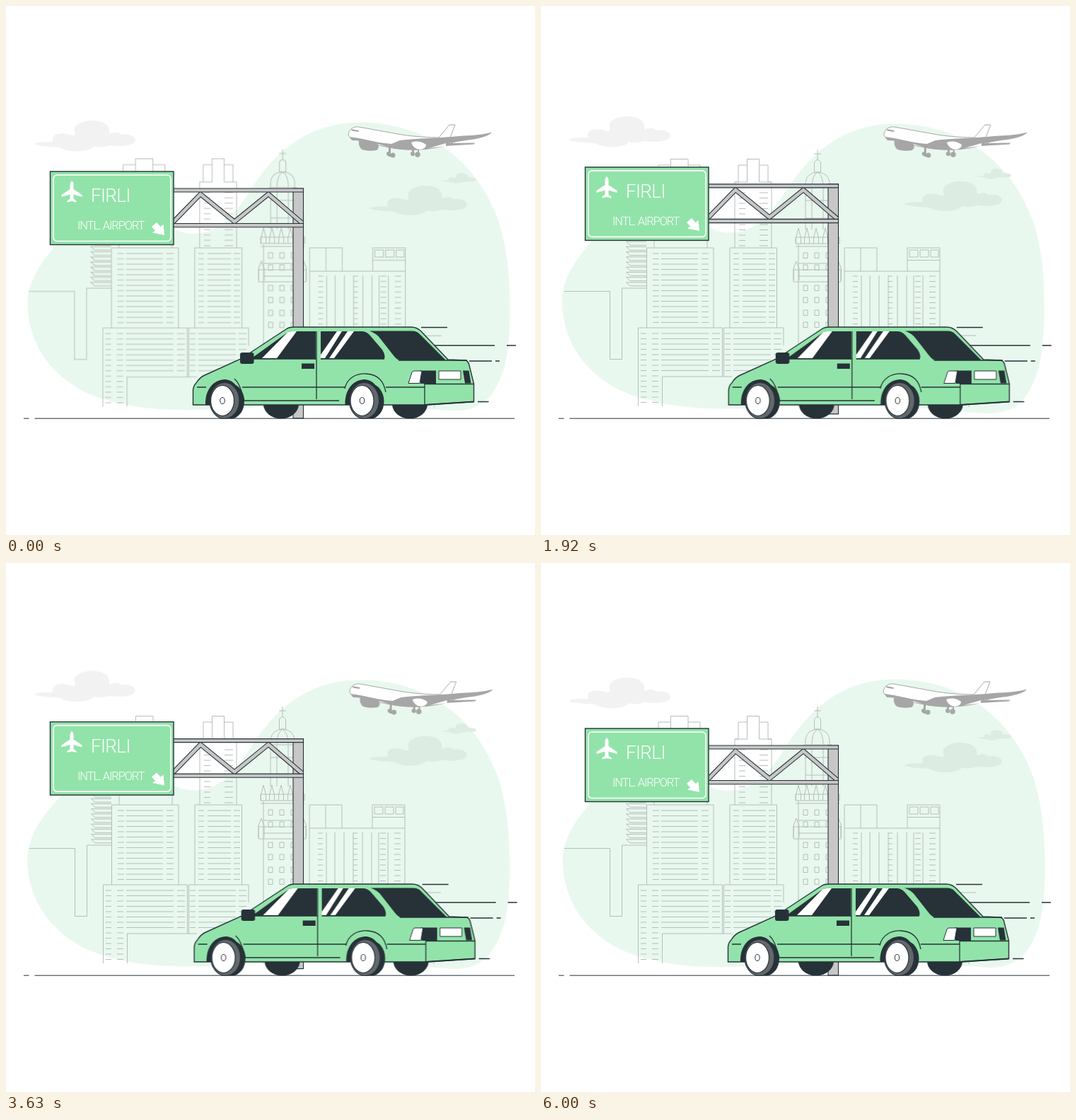
Animation, 748 px wide and 748 px high, one loop 6.04 s. Source, as an HTML page:

```html
<!DOCTYPE html>
<html lang="en">
<head>
<meta charset="utf-8">
<title>Drive to the airport</title>
<style>
  html, body { margin: 0; width: 100%; height: 100%; overflow: hidden; background: #fff; }
  svg { display: block; width: 100vw; height: 100vh; }
  :root { --ink: #263238; --green: #92e3a9; --steel: #c7c7c7; --plane: #a6a6a6; }

  .move { transform-box: view-box; animation: linear -15ms infinite; }
  .blob { transform-origin: 371px 368px; animation-name: sway; animation-duration: 1510ms; }
  .city { transform-origin: 322.7px 387px; animation-name: pulse; animation-duration: 6040ms; }
  .float { animation-name: float; animation-duration: 1510ms; animation-timing-function: ease-in-out; }
  .shake { animation-name: shake; animation-duration: 3020ms; }

  @keyframes sway { 25% { transform: rotate(1deg); } 75% { transform: rotate(-1deg); } }
  @keyframes pulse {
    0%, 28.8%, 40%, 59.7%, 100% { transform: scale(1); }
    9.5%, 50% { transform: scale(1.099); }
  }
  @keyframes float { 50% { transform: translateY(-10px); } }
  @keyframes shake {
    10%, 90% { transform: translateX(-1px); }
    20%, 80% { transform: translateX(2px); }
    30%, 50%, 70% { transform: translateX(-4px); }
    40%, 60% { transform: translateX(4px); }
  }

  .city { fill: none; stroke: #b8bdba; stroke-width: 1; }
  .line { fill: none; stroke: var(--ink); stroke-width: 1.3; }
  .ground { stroke-width: 1; }
  .steel { fill: var(--steel); stroke: var(--ink); stroke-width: 1.1; }
  .green { fill: var(--green); stroke: var(--ink); stroke-width: 1.4; }
  .gray { fill: var(--plane); stroke: none; }
  .dark { fill: var(--ink); }
  .white { fill: #fff; }
  .sign-text { fill: #fff; font-family: Roboto, "Open Sans", "Noto Sans", sans-serif; font-weight: 300; }
</style>
</head>
<body>
<svg viewBox="0 0 748 748">
  <defs>
    <path id="cloud" d="M40 195C46 191 58 193 67 192C62 181 78 177 93 183C96 184 99 182 97 178C94 169 107 162 121 162C138 162 148 168 146 181C155 177 160 179 163 182C175 179 184 186 183 190C182 197 165 200 146 197C140 199 132 201 124 198C120 207 88 208 76 200C60 199 44 198 40 195Z"/>
    <path id="truss" d="M236 306L275 266L323 305L371 266L419 307"/>
    <g id="wheel">
      <path class="dark" d="M-24 6C-25 -16 -12 -30 4 -30C20 -29 27 -10 28 6Z"/>
      <ellipse class="dark" cx="12" cy="1" rx="19" ry="24.5"/>
      <ellipse cx="3" rx="21" ry="25.5" fill="#62686b" stroke="#263238" stroke-width="1.2"/>
      <ellipse rx="16.5" ry="21.5" fill="#fff" stroke="#263238" stroke-width="1.2"/>
      <ellipse rx="3.2" ry="4.5" fill="#fff" stroke="#263238"/>
    </g>
  </defs>

  <path class="move blob" fill="#e8f8ee" d="M30.5 425C29 392 49 362 74 335C104 302 135 285 172 287C209 289 225 318 260 322C304 324 325 292 345 262C378 208 425 164.500 502 164.500C590 165 663 214 695 300C709 340 712.500 385 712.500 430C712.500 480 708 516 690 544C678 564 658 572 636 572C560 570 480 556 400 562C340 569 290 572 240 571C190 570 140 561 104 542C58 515 33 475 30.500 425Z"/>

  <g class="move city">
    <path d="M33 403.5H97.500V499.500H114.500V399H149.500M149.500 455V342H244V455M160 342V260H166V225H183.500V216.500H208V225H225V260H235V342M183.500 225V250M208 225V250"/>
    <path d="M137.500 566V455H256.500V524M258.500 524V455H343V480M171.500 566V524H270"/>
    <path d="M267 455V342H333.500V455M274 342V249H279V225H291.500V216.500H308.500V225H321V249H326V342M274 249H291.500V225M326 249H308.500V225"/>
    <path d="M391 203V218M386 209H396M386.500 235V221Q391 214 395.500 221V235ZM374 256V249Q376 236 391 235Q406 236 408 249V256M371 257H411M374 257V316M408 257V316M383 257V316M399 257V316M383 256Q383 240 391 235Q399 240 399 256M374 300H408M374 275H408"/>
    <path d="M360 336V327H422V336ZM364 337V567M416 337V567M360 340H422M357 390V373H424V390ZM364 382H416M364 364H416"/>
    <path d="M429 455V342H475V375M452 342V375M429 375H564V466M518 375V342H564V375M518 359.500H564M588 466H615M605 549V567M521 345H533V355H521ZM536 345H548V355H536ZM551 345H562V355H551Z"/>
    <path id="details"/>
  </g>

  <g class="move float">
    <use href="#cloud" fill="#f2f2f2"/>
    <g fill="#ddece3">
      <use href="#cloud" transform="translate(475.400 97.700) scale(.965)"/>
      <use href="#cloud" transform="translate(603.600 182) scale(.335)"/>
    </g>
    <path class="steel" d="M406 258H420.500V583H406Z"/>
    <use href="#truss" fill="none" stroke="#263238" stroke-width="6.800"/>
    <use href="#truss" fill="none" stroke="#c7c7c7" stroke-width="4.600"/>
    <path class="steel" d="M236 258H420.500V263H236ZM236 307.500H420.500V312.700H236Z"/>
    <rect class="green" x="62.500" y="234" width="174.500" height="103.500"/>
    <rect x="67" y="239" width="166" height="93.500" rx="5" fill="none" stroke="#fff" stroke-width="1.600"/>
    <path class="white" d="M93 247Q95.500 249 95.500 253V259L107.500 267V270L95.500 266.500V272.500L99.500 275.500V277.500L93 276L86.500 277.500V275.500L90.500 272.500V266.500L78.500 270V267L90.500 259V253Q90.500 249 93 247ZM213 306L218.500 312L222.500 309L224 324L207 320.500L211 317.500L206 312Z"/>
    <text class="sign-text" x="120" y="277" font-size="26" letter-spacing="-.6">FIRLI</text>
    <text class="sign-text" x="101" y="316" font-size="16.500" letter-spacing="-1.100">INTL. AIRPORT</text>
  </g>

  <path class="line ground" d="M25 583.200H32.500M40.500 583.200H719"/>

  <g class="move shake">
    <g fill="#fff" stroke="#a6a6a6" stroke-width="1">
      <path d="M484 181C486 174 491 170 499 171L560 182C580 185 600 186 612 186L627 168H635L628 186L642 188C628 197 600 203 575 203C540 203 500 190 490 188Q485 187 484 181Z"/>
      <g class="gray">
        <path d="M486 185L489 190C510 190 525 194 541 200C565 206 600 204 620 198L662 195.500L663 193.500L626 194L650 190C668 188 684 184 686.500 178.500C675 182 660 183 640 184C612 187 580 187 557 190L545 195C525 194 505 187 486 185Z"/>
        <path d="M499 191Q512 188 525 193Q529 201 524 204Q509 206 502 202Q498 197 499 191ZM541 200H544V213H541ZM574 203H577V212H574ZM582 203H584V212H582Z"/>
        <circle cx="541" cy="209" r="3"/><circle cx="547" cy="211" r="3.500"/>
        <circle cx="575" cy="209" r="3"/><circle cx="582" cy="210" r="3.800"/>
        <path d="M488 174L499 176L498 178L489 176.500Z"/>
      </g>
      <path stroke="none" d="M573 193Q584 189 594 196Q594 202 585 203Q576 202 573 193ZM598 201L622 194V198Z"/>
    </g>

    <path class="line" d="M587 454.500H624M606 480H691M708 480H721M655 502H687M692 502H698M667 559.500H682.500"/>
    <g class="dark">
      <ellipse cx="389" cy="563" rx="25" ry="20.500"/>
      <ellipse cx="571" cy="563" rx="25" ry="20.500"/>
    </g>
    <path class="green" d="M264.500 564V543Q265 537 269 533Q274 525 281 522L332 499L396 457Q400 454 407 454H573Q581 454 587 460L625 500L650 501Q653 502 654.500 506L661.500 534V559.500L592 564Z"/>
    <path class="dark" d="M346 499L396 463Q400 460 404 460H438V499ZM445 460H503Q509 460 514 465L532 486Q537 494 535 499H445ZM514 459.500H573Q580 459 584 463L622 501H557Q552 500 547 493L529 470Q524 463 514 459.500Z"/>
    <path class="white" d="M362 498L398 461.500Q401 460 404 460H411L383 498ZM445 493L468 460H475L451 498H445ZM457 498L483 460H492L464 498Z"/>
    <path class="line" d="M346 499H439M445 499H535M555 501H652M439 460V556M270 539H283M334 539H479M537 539H592M592 517V564M592 534.500H661M323 527C331 534 333 546 337 558H471M479 541C482 526 495 519.500 509 520C527 521 534 531 537 546"/>
    <path class="dark" d="M592 563L661.500 558.500V560.500L592 565ZM585 515.500H608V534H586ZM646 515.500H654.500L657.500 533.500H649ZM418 505.500H436V513H418Z"/>
    <rect class="dark" x="331" y="490" width="19.500" height="16" rx="3"/>
    <path d="M569 533.500L574 518Q575 516 577 516H588L585 533.500ZM612 516H643V528H612Z" fill="#fff" stroke="#263238"/>
    <use href="#wheel" x="306" y="558"/>
    <use href="#wheel" x="503.500" y="558"/>
  </g>
</svg>
<script>
  const bits = [];
  const rows = (spans, top, bottom, step) => {
    for (let y = top; y <= bottom; y += step)
      for (const [from, to] of spans) bits.push(`M${from} ${y}H${to}`);
  };
  const box = (x, y, w, h) => bits.push(`M${x} ${y}h${w}v${h}h${-w}z`);

  // tower facades
  rows([[158, 167], [170, 222], [227, 237]], 350, 452, 7.5);
  rows([[141, 149], [157, 166]], 463, 566, 7.5);
  rows([[170, 237], [242, 253], [260, 268], [272, 325], [329, 340]], 463, 520, 7.5);
  rows([[272, 280], [285, 318], [322, 331]], 350, 452, 7.5);
  rows([[280, 289], [309, 321]], 264, 340, 7.5);
  rows([[441, 448], [491, 497], [529, 537], [549, 558]], 382, 455, 7.5);
  for (const x of [453, 465, 478, 491, 504, 517, 527, 540]) bits.push(`M${x} 381V455`);

  // slanted balconies
  for (let y = 326; y < 396; y += 7.2) bits.push(`M149 ${y}H120.500L126 ${y + 5}H149`);

  // church windows and spires
  for (const y of [349, 366, 395, 412, 430, 447])
    for (const x of [371, 387, 403]) box(x, y, 6, 7.5);
  for (const x of [364, 376, 389, 402, 417]) bits.push(`M${x - 3.5} 336V328L${x} 314L${x + 3.5} 328V336`);
  for (const x of [361, 420.5]) bits.push(`M${x - 4} 388V371L${x} 361L${x + 4} 371V388`);

  document.getElementById("details").setAttribute("d", bits.join(""));
</script>
</body>
</html>
```
